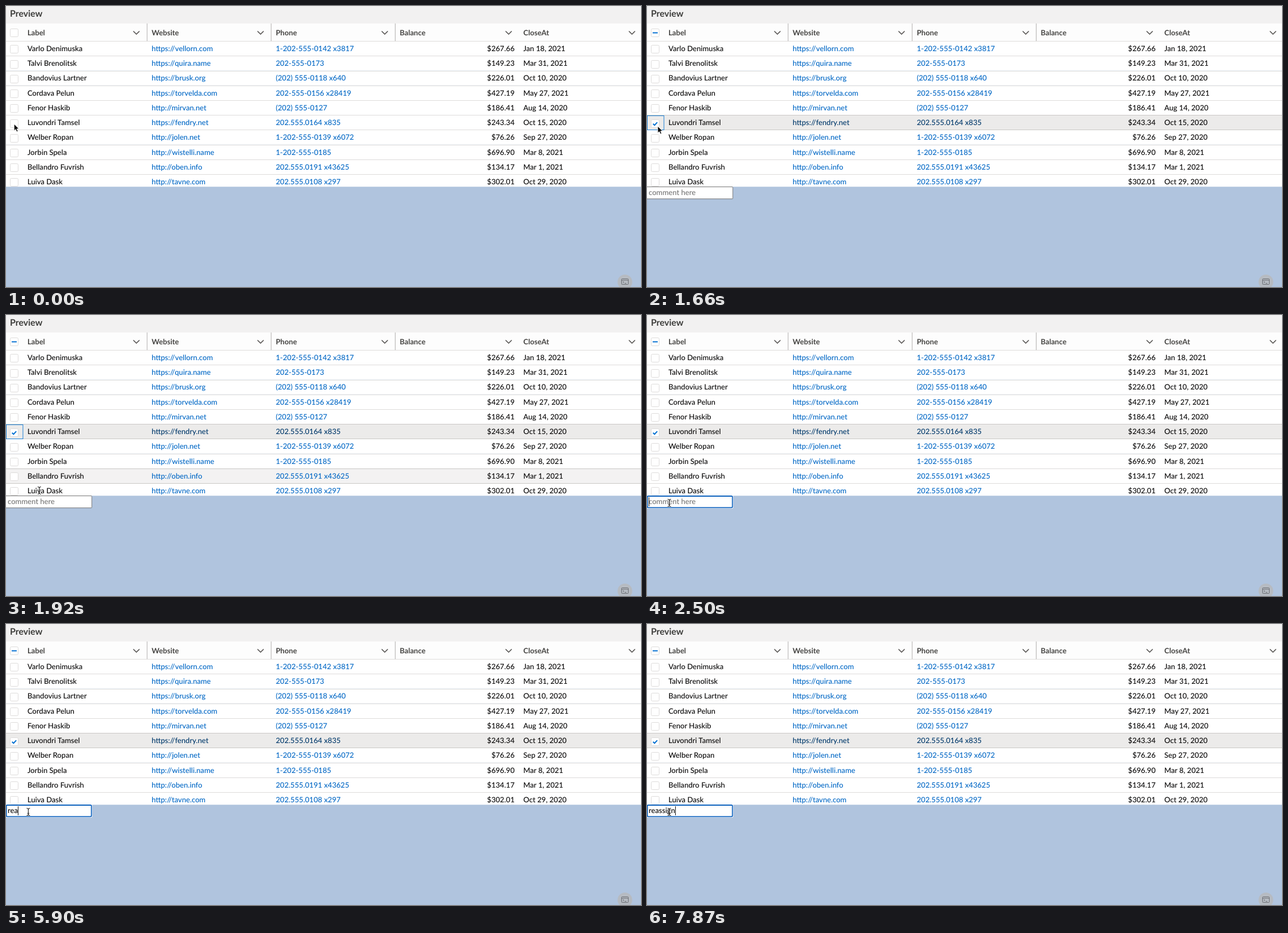
Recreate the animation shown at these times as an HTML page. Size 1125 by 498 pixels, loop 7.99 s.

```html
<!DOCTYPE html>
<html lang="en">
<head>
<meta charset="utf-8">
<title>Preview</title>
<style>
  html, body { margin: 0; width: 100%; height: 100%; overflow: hidden; background: #b0c4de; }
  svg { display: block; width: 1125px; height: 498px; }
  text { font: 500 13.1px Lato, "Open Sans", sans-serif; fill: #080707; white-space: pre; text-rendering: geometricPrecision; }
  .title { font-size: 16px; font-weight: 700; fill: #3e3e3c; }
  .head { font-weight: 700; fill: #454442; }
  .link { fill: #0067c5; }
  .selected .link { fill: #00396b; }
  .right { text-anchor: end; }
  .back { fill: #fff; }
  .hover .back { fill: #f3f2f2; }
  .selected .back { fill: #ecebea; }
  .edge { fill: #dddbda; }
  .hover .edge, .selected .edge { fill: #c9c7c5; }
  .box { fill: #fff; stroke: #dddbda; }
  .mark { fill: none; stroke: #0070d2; stroke-width: 2; visibility: hidden; }
  .selected .mark, .partial .mark { visibility: visible; }
  .chevron { fill: none; stroke: #514f4d; stroke-width: 1.6; stroke-linecap: round; stroke-linejoin: round; }
  .divider { fill: #b0adab; }
  #hint { fill: #757575; }
</style>
</head>
<body>
<svg id="stage" viewBox="0 0 1125 498">
  <rect width="1125" height="31" fill="#f2f1f1"/>
  <text class="title" x="7" y="19">Preview</text>
  <g id="header"><rect y="31" width="1125" height="32" fill="#fdfdfd"/></g>
  <g id="rows"></g>
  <rect y="320.3" width="1125" height="178" fill="#b0c4de"/>
  <rect id="cellRing" x=".5" y="194.5" width="29.5" height="25" fill="none" stroke="#1b7fd6"/>

  <circle cx="1096.5" cy="489" r="13" fill="#b6bbc2"/>
  <g fill="none" stroke="#6a6d72">
    <rect x="1090.5" y="483.5" width="12" height="10" rx="1"/>
    <path d="M1090.5 486h12M1092.7 487.8l2 1.7-2 1.7M1096 491.5h3"/>
  </g>

  <g id="field">
    <g id="plain">
      <rect x="-2.5" y="320.5" width="154.5" height="21.3" rx="1" fill="#fff" stroke="#767676"/>
    </g>
    <g id="focused">
      <rect x="-1" y="319.5" width="154" height="23.5" rx="3" fill="#fff"/>
      <rect x=".6" y="321" width="150.8" height="20.3" rx="1.8" fill="#fff" stroke="#0b60bd" stroke-width="1.8"/>
    </g>
    <text id="hint" x="3" y="335.3">comment here</text>
    <text id="typed" x="3" y="335.3"></text>
    <rect id="caret" y="323" width="1" height="16" fill="#111"/>
  </g>

  <g id="pointer">
    <path id="arrow" d="M0 0V12.2L2.8 9.6 4.8 14 6.9 13.1 5 8.8H8.7Z" fill="#000" stroke="#fff" stroke-width=".9"/>
    <g id="beam" fill="none">
      <path d="M-3-6.5Q0-6.5 0-4Q0-6.5 3-6.5M0-4V4M-3 6.5Q0 6.5 0 4Q0 6.5 3 6.5M-1.8 2.5H1.8" stroke="#fff" stroke-opacity=".65" stroke-width="2.4"/>
      <path d="M-3-6.5Q0-6.5 0-4Q0-6.5 3-6.5M0-4V4M-3 6.5Q0 6.5 0 4Q0 6.5 3 6.5M-1.8 2.5H1.8" stroke="#222" stroke-width="1.2"/>
    </g>
  </g>
</svg>
<script>
const LOOP = 7990;
const ROW_TOP = 62.05, ROW_HEIGHT = 26.24, PICKED = 5;
const COLUMNS = [["Label", 38], ["Website", 258], ["Phone", 478], ["Balance", 697.5], ["CloseAt", 916.5]];
const CHEVRONS = [231, 451, 671, 890.5, 1109];
const DIVIDERS = [249.5, 469.3, 689.1];
const DATA = [
  ["Varlo Denimuska", "https://vellorn.com", "1-202-555-0142 x3817", "$267.66", "Jan 18, 2021"],
  ["Talvi Brenolitsk", "https://quira.name", "202-555-0173", "$149.23", "Mar 31, 2021"],
  ["Bandovius Lartner", "https://brusk.org", "(202) 555-0118 x640", "$226.01", "Oct 10, 2020"],
  ["Cordava Pelun", "https://torvelda.com", "202-555-0156 x28419", "$427.19", "May 27, 2021"],
  ["Fenor Haskib", "http://mirvan.net", "(202) 555-0127", "$186.41", "Aug 14, 2020"],
  ["Luvondri Tamsel", "https://fendry.net", "202.555.0164 x835", "$243.34", "Oct 15, 2020"],
  ["Welber Ropan", "http://jolen.net", "1-202-555-0139 x6072", "$76.26", "Sep 27, 2020"],
  ["Jorbin Spela", "http://wistelli.name", "1-202-555-0185", "$696.90", "Mar 8, 2021"],
  ["Bellandro Fuvrish", "http://oben.info", "202.555.0191 x43625", "$134.17", "Mar 1, 2021"],
  ["Luiva Dask", "http://tavne.com", "202.555.0108 x297", "$302.01", "Oct 29, 2020"]
];

// Each entry holds from its time until the next one.
const POINTER = [
  [0, 14.3, 209], [80, 13.3, 208.4], [170, 12.5, 207.8], [1660, 19, 213],
  [1730, 44, 258, "beam"], [1810, 59.5, 295.5, "beam"], [1870, 59, 311, "beam"],
  [1930, 56, 323, "beam"], [1990, 52, 330, "beam"], [2050, 48, 333, "beam"],
  [2110, 45, 334, "beam"], [2170, 42, 334, "beam"], [2260, 39.5, 333, "beam"]
];
const HOVER = [[0, -1], [1040, 5], [1730, 6], [1810, 7], [1870, 8], [1930, 9], [1990, -1]];
const TYPING = [
  [0, "", 0], [2500, "", 1], [2980, "", 0], [3520, "", 1], [4000, "", 0], [4480, "", 1],
  [5020, "", 0], [5110, "r", 1], [5190, "re", 1], [5670, "re", 0], [5900, "rea", 1],
  [6380, "rea", 0], [6910, "rea", 1], [7030, "reas", 1], [7150, "reass", 1],
  [7630, "reass", 0], [7750, "reassig", 1], [7870, "reassign", 1]
];
const CHECKED_AT = 1130, FIELD_AT = 1220, FOCUS_AT = 2500;

const $ = id => document.getElementById(id);
const at = (steps, t) => steps.findLast(step => step[0] <= t);
const show = (id, on) => { $(id).style.display = on ? "" : "none"; };

function add(parent, tag, attrs, content = "") {
  const node = document.createElementNS("http://www.w3.org/2000/svg", tag);
  for (const key in attrs) node.setAttribute(key, attrs[key]);
  node.textContent = content;
  return parent.appendChild(node);
}

function addCheckbox(parent, y, mark) {
  add(parent, "rect", { class: "box", x: 7.5, y: y - 7, width: 14, height: 14, rx: 2 });
  add(parent, "path", { class: "mark", d: `M14.5 ${y}${mark}` });
}

function buildHeader() {
  const header = $("header");
  addCheckbox(header, 47.5, "m-4.5 0h9");
  COLUMNS.forEach(([name, x], i) => {
    add(header, "text", { class: "head", x, y: 52 }, name);
    add(header, "path", { class: "chevron", d: `M${CHEVRONS[i] - 5} 45l5 5 5-5` });
  });
  DIVIDERS.forEach(x => add(header, "rect", { class: "divider", x, y: 31, width: 1, height: 31 }));
}

function buildRow(cells, i) {
  const top = ROW_TOP + i * ROW_HEIGHT;
  const row = add($("rows"), "g", {});
  add(row, "rect", { class: "back", y: top, width: 1125, height: ROW_HEIGHT });
  for (const edge of [top, top + ROW_HEIGHT])
    add(row, "rect", { class: "edge", y: Math.round(edge), width: 1125, height: 1 });
  addCheckbox(row, Math.round(top + 14.25) + .5, "m-3.8 .2l2.7 2.6 4.8-5.2");
  cells.forEach((content, c) => {
    const kind = c === 1 || c === 2 ? "link" : c === 3 ? "right" : "";
    add(row, "text", { class: kind, x: c === 3 ? 901 : COLUMNS[c][1], y: top + 17.95 }, content);
  });
  return row;
}

buildHeader();
const rows = DATA.map(buildRow);

function render(t) {
  const checked = t >= CHECKED_AT, focused = t >= FOCUS_AT;
  const [, hovered] = at(HOVER, t);
  rows.forEach((row, i) => {
    row.classList.toggle("hover", i === hovered);
    row.classList.toggle("selected", checked && i === PICKED);
  });
  // Highlighted rows must paint their edges over their neighbours.
  for (const i of [PICKED, hovered]) if (rows[i]) $("rows").append(rows[i]);
  $("header").classList.toggle("partial", checked);
  show("cellRing", checked && !focused);

  const [, typed, caret] = at(TYPING, t);
  show("field", t >= FIELD_AT);
  show("plain", !focused);
  show("focused", focused);
  show("hint", !typed);
  show("caret", caret);
  $("typed").textContent = typed;
  $("caret").setAttribute("x", typed ? Math.round(3 + $("typed").getComputedTextLength()) : 3);

  const [, x, y, shape] = at(POINTER, t);
  $("pointer").setAttribute("transform", `translate(${x} ${y})`);
  show("arrow", shape !== "beam");
  show("beam", shape === "beam");
}

const start = performance.now();
function tick() {
  render((performance.now() - start) % LOOP);
  requestAnimationFrame(tick);
}
tick();
</script>
</body>
</html>
```
